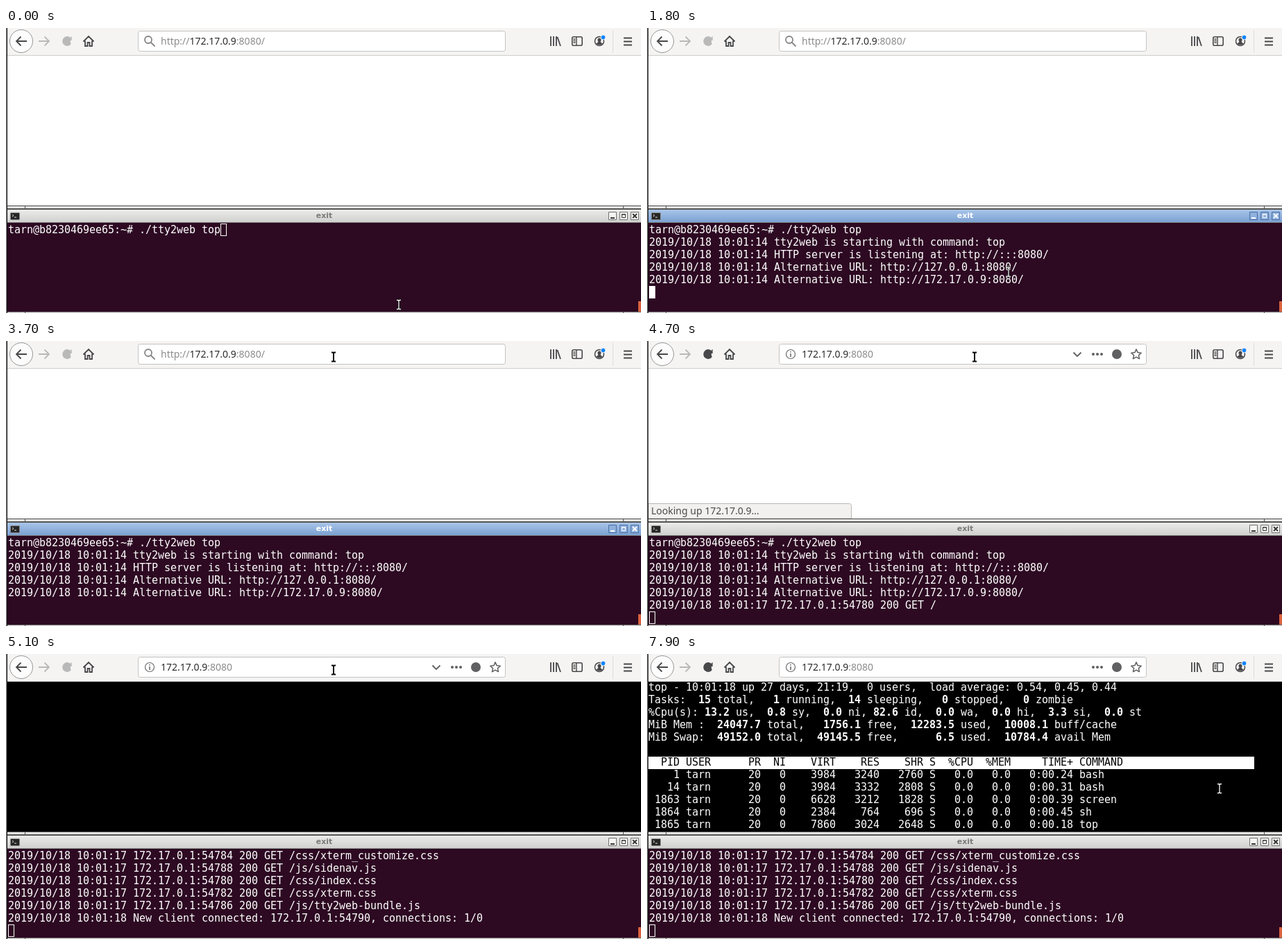
These frames come from a looping animation (915x411 px, 8000 ms). An HTML page:

```html
<!DOCTYPE html>
<html lang="en">
<head>
<meta charset="utf-8">
<title>Terminal in the browser</title>
<style>
html, body { margin: 0; width: 100%; height: 100%; overflow: hidden; background: #fff; }
svg { display: block; width: 915px; height: 411px; }
.mono { font: 15px "DejaVu Sans Mono", monospace; letter-spacing: -.031px; fill: #fff; }
.mono .b { font-weight: bold; }
.ui { font: 14px "Noto Sans", "Open Sans", sans-serif; fill: #8b8b8d; }
.ui .d { fill: #2c2c2e; }
.title { font: bold 11px "DejaVu Sans", sans-serif; text-anchor: middle; }
.size { font: 32px "DejaVu Sans Mono", monospace; letter-spacing: -.266px; fill: #101010; }
.ic { fill: none; stroke: #48484a; stroke-width: 1.8; }
.off { stroke: #b9b9b9; }
.btn { fill: #f6f6f5; stroke: #70706e; }
</style>
</head>
<body>
<svg viewBox="0 0 915 411" xmlns="http://www.w3.org/2000/svg">
  <defs>
    <linearGradient id="grey" x2="0" y2="1"><stop stop-color="#ebebea"/><stop offset="1" stop-color="#cfcfcd"/></linearGradient>
    <linearGradient id="blue" x2="0" y2="1"><stop stop-color="#a9c5e8"/><stop offset="1" stop-color="#789fd1"/></linearGradient>
    <g id="reload">
      <path d="M93.2 22.2A6 6 0 1 1 92.2 14.6"/>
      <path d="M94.6 11.8v6.2h-6.2z" stroke="none"/>
    </g>
  </defs>

  <!-- browser page -->
  <rect width="915" height="411" fill="#fff"/>
  <rect data-t="4800-8000" x="2" y="40" width="913" height="216"/>
  <g id="top" class="mono" data-t="5200-8000"></g>
  <g id="size">
    <rect x="396" y="123" width="127" height="50" rx="15" fill="#f0f0f0"/>
    <text class="size" x="412" y="159">98x12</text>
  </g>
  <g data-t="4700-5000">
    <path d="M2 234.5h289.500q3 0 3 3V256H2z" fill="#f2f1f0" stroke="#b8b8b6"/>
    <text class="ui" x="6" y="250" style="fill:#4a4a4a">Looking up 172.17.0.9…</text>
  </g>

  <!-- toolbar -->
  <rect width="915" height="39" fill="#f5f4f3"/>
  <rect y="39" width="915" height="1" fill="#cdcdcc"/>
  <circle cx="22" cy="19" r="16.500" fill="#fcfcfc" stroke="#969696"/>
  <path class="ic" stroke-width="2" d="M15 19H30M21.500 12.500 15 19l6.500 6.500"/>
  <path class="ic off" d="M47 19H62M55.500 12.500 62 19l-6.500 6.500"/>
  <g class="ic off" data-t="0-3900 3900-4700 4900-5500"><use href="#reload" fill="#b9b9b9"/></g>
  <path class="ic off" data-t="4800-4900" d="M82.500 21.500A6 6 0 1 1 92 23.500"/>
  <g class="ic" data-t="4700-4800 5500-8000"><use href="#reload" fill="#48484a"/></g>
  <path class="ic" d="M111.500 19.500 119 12l7.500 7.500M114 18.500V26h3.500v-5h3v5h3.500v-7.500"/>
  <rect x="190.500" y="4.500" width="529" height="29" rx="3" fill="#fff" stroke="#c3c3c3"/>
  <rect data-t="3900-4700" x="191" y="5" width="528" height="28" rx="3" fill="none" stroke="#0a84ff" stroke-width="2"/>
  <g data-t="0-4700">
    <path class="ic" style="stroke:#858587" d="M210 17a5 5 0 1 1-10 0a5 5 0 1 1 10 0M208.500 20.500l6 6"/>
    <text class="ui" x="223" y="24">http://<tspan class="d">172.17.0.9</tspan>:8080/</text>
  </g>
  <g data-t="4700-8000">
    <circle class="ic" style="stroke:#6c6c6e;stroke-width:1.2" cx="207" cy="19" r="6.500"/>
    <path class="ic" style="stroke:#6c6c6e;stroke-width:1.6" d="M207 18v5M207 15v1.600"/>
    <text class="ui" x="223" y="24"><tspan class="d">172.17.0.9</tspan>:8080</text>
    <g fill="#606062"><circle cx="643" cy="19" r="2"/><circle cx="649" cy="19" r="2"/><circle cx="655" cy="19" r="2"/><circle cx="677" cy="19" r="7"/></g>
    <path id="star" class="ic" style="stroke:#606062;stroke-width:1.500;stroke-linejoin:round"/>
  </g>
  <path data-t="3900-5800" class="ic" style="stroke:#606062" d="M614.500 16.500l5.500 5.500 5.500-5.500"/>
  <path class="ic" d="M785 12v14M789 12v14M793 12v14M794.500 13l4.500 13"/>
  <rect class="ic" style="stroke-width:1.600" x="815.800" y="12.800" width="14.400" height="12.400" rx="2"/>
  <path class="ic" style="stroke-width:1.400" d="M822 13v12M817.500 16h3M817.500 18.500h3M817.500 21h3"/>
  <circle class="ic" style="stroke-width:1.500" cx="855" cy="19" r="6.500"/>
  <path fill="#48484a" d="M852.500 17a2.500 2.500 0 0 1 5 0q0 2-1 3l3 2.500q-4.500 4-9 0l3-2.500q-1-1-1-3"/>
  <circle cx="860.500" cy="13.500" r="3.400" fill="#0a84ff" stroke="#f5f4f3"/>
  <rect x="874" y="3" width="1" height="33" fill="#dcdcda"/>
  <path class="ic" d="M890 14.500h12M890 19.500h12M890 24.500h12"/>

  <!-- window frames -->
  <rect y="256" width="915" height="1" fill="#4c4c4c"/>
  <rect y="257" width="915" height="4" fill="#e4e4e2"/>
  <path d="M27.500 257v3M889.500 257v3" stroke="#555"/>
  <rect y="260" width="915" height="2" fill="#565654"/>
  <rect x="2" y="262" width="913" height="19" fill="url(#grey)"/>
  <rect data-t="700-3900" x="2" y="262" width="913" height="19" fill="url(#blue)"/>
  <rect x="2" y="280" width="913" height="1" fill="#7d7d7b"/>
  <text data-t="0-700 3900-8000" class="title" x="458.500" y="274" fill="#7a7a78">exit</text>
  <text data-t="700-3900" class="title" x="458.500" y="274" fill="#fff">exit</text>
  <rect x="6.500" y="266.500" width="13" height="10" rx="1" fill="#262626" stroke="#888"/>
  <path d="M9 269l2 1.500-2 1.500M12 273h3" fill="none" stroke="#ddd"/>
  <g data-t="0-700 3900-8000" class="btn"><path d="M868.500 265.500h11v11h-11zM884.500 265.500h11v11h-11zM900.500 265.500h11v11h-11z"/></g>
  <g data-t="700-3900" class="btn" style="fill:#8fb0dc;stroke:#4a6fa5"><path d="M868.500 265.500h11v11h-11zM884.500 265.500h11v11h-11z"/><path d="M900.500 265.500h11v11h-11z"/></g>
  <g data-t="0-700 3900-8000" fill="none" stroke="#333"><path stroke-width="2" d="M871 274h6"/><path d="M887.500 268.500h5v5h-5zM887 269h6"/><path stroke-width="1.800" d="M903 268l6 6M909 268l-6 6"/></g>
  <g data-t="700-3900" fill="none" stroke="#fff"><path stroke-width="2" d="M871 274h6"/><path d="M887.500 268.500h5v5h-5zM887 269h6"/><path stroke-width="1.800" d="M903 268l6 6M909 268l-6 6"/></g>

  <!-- terminal -->
  <rect x="2" y="281" width="913" height="128" fill="#2d0922"/>
  <rect x="911" y="394" width="4" height="15" fill="#d9623f"/>
  <rect y="409" width="915" height="1" fill="#6a6a68"/>
  <rect y="410" width="915" height="1" fill="#e4e4e2"/>
  <path d="M27.500 409v2M889.500 409v2" stroke="#444"/>
  <g id="log" class="mono"></g>
  <rect id="caret" width="8" height="17" stroke="#fff"/>
  <rect width="1" height="411" fill="#8a8a8a"/>
  <rect x="1" width="1" height="411" fill="#111"/>

  <g id="beam" fill="none">
    <path id="halo" stroke-width="3" d="M-3-6.500h2l1 1 1-1h2M0-5.500v11M-3 6.500h2l1-1 1 1h2"/>
    <path id="ink" stroke-width="1.300" d="M-3-6.500h2l1 1 1-1h2M0-5.500v11M-3 6.500h2l1-1 1 1h2"/>
  </g>
  <path id="arrow" d="M0 0v14l3.300-3 2.200 5 2.200-1-2.200-4.800H10z" stroke="#fff"/>
</svg>
<script>
const LOOP = 8000, STEP = 100;
const $ = id => document.getElementById(id);
const keep = s => s.replace(/ /g, '\u00a0');
const line = (x, y, s, attr = '') => `<text x="${x}" y="${y}" ${attr}>${s}</text>`;

// process monitor
const user = 'tarn';
const summary = [
  'top - 10:01:18 up 27 days, 21:19,  0 users,  load average: 0.54, 0.45, 0.44',
  'Tasks:  15 total,   1 running,  14 sleeping,   0 stopped,   0 zombie',
  '%Cpu(s): 13.2 us,  0.8 sy,  0.0 ni, 82.6 id,  0.0 wa,  0.0 hi,  3.3 si,  0.0 st',
  'MiB Mem :  24047.7 total,   1756.1 free,  12283.5 used,  10008.1 buff/cache',
  'MiB Swap:  49152.0 total,  49145.5 free,      6.5 used.  10784.4 avail Mem'
];
const heading = '  PID USER      PR  NI    VIRT    RES    SHR S  %CPU  %MEM     TIME+ COMMAND';
const tasks = [
  [1, 3984, 3240, 2760, '24', 'bash'],
  [14, 3984, 3332, 2808, '31', 'bash'],
  [1863, 6628, 3212, 1828, '39', 'screen'],
  [1864, 2384, 764, 696, '45', 'sh'],
  [1865, 7860, 3024, 2648, '18', 'top']
];
const pad = (v, n) => String(v).padStart(n);
const taskRow = ([pid, virt, res, shr, time, cmd]) =>
  `${pad(pid, 5)} ${user}      20   0 ${pad(virt, 7)}${pad(res, 7)}${pad(shr, 7)} S   0.0   0.0   0:00.${time} ${cmd}`;
const rowY = i => 53 + 18 * i;

$('top').innerHTML =
  summary.map((s, i) => line(2, rowY(i), i
    ? keep(s).replace(/\d+(\.\d)?/g, '<tspan class="b">$&</tspan>') : keep(s))).join('') +
  '<rect x="2" y="148" width="873" height="18"/>' +
  line(2, rowY(6), keep(heading), 'style="fill:#000"') +
  tasks.map((r, i) => line(2, rowY(7 + i), keep(taskRow(r)))).join('');

// server log
const get = (port, path) => `2019/10/18 10:01:17 172.17.0.1:${port} 200 GET /${path}`;
const first = '2019/10/18 10:01:14 ';
const log = [
  user + '@b8230469ee65:~# ./tty2web top',
  first + 'tty2web is starting with command: top',
  first + 'HTTP server is listening at: http://:::8080/',
  first + 'Alternative URL: http://127.0.0.1:8080/',
  first + 'Alternative URL: http://172.17.0.9:8080/',
  get(54780, ''),
  get(54786, 'config.js'),
  get(54784, 'css/xterm_customize.css'),
  get(54788, 'js/sidenav.js'),
  get(54780, 'css/index.css'),
  get(54782, 'css/xterm.css'),
  get(54786, 'js/tty2web-bundle.js'),
  '2019/10/18 10:01:18 New client connected: 172.17.0.1:54790, connections: 1/0'
];
const logSize = [[0, 1], [1800, 5], [4700, 6], [4800, 12], [5100, 13]];

$('star').setAttribute('d', 'M' + Array.from({ length: 10 }, (_, i) => {
  const a = i * Math.PI / 5, r = i % 2 ? 3.6 : 7.6;
  return (705 + r * Math.sin(a)).toFixed(1) + ' ' + (19.5 - r * Math.cos(a)).toFixed(1);
}).join('L') + 'z');

// pointer path: time, x, y
const path = [
  [400, 566, 399], [700, 521, 352], [2300, 521, 352], [2500, 462, 326], [2700, 396, 291],
  [2900, 455, 262], [3100, 533, 242], [3200, 533, 242], [3400, 505, 115], [3500, 486, 48],
  [3600, 474, 17], [3700, 472, 23], [5600, 472, 23], [6000, 520, 66], [6300, 606, 124],
  [6500, 762, 154], [6800, 840, 184], [7700, 840, 184], [7900, 825, 194]
];
function pointer(t) {
  const i = path.findIndex(p => p[0] > t);
  if (i === 0) return path[0].slice(1);
  if (i < 0) return path[path.length - 1].slice(1);
  const [a, ax, ay] = path[i - 1], [b, bx, by] = path[i], k = (t - a) / (b - a);
  return [Math.round(ax + (bx - ax) * k), Math.round(ay + (by - ay) * k)];
}

const timed = [...document.querySelectorAll('[data-t]')].map(el =>
  [el, el.dataset.t.split(' ').map(r => r.split('-').map(Number))]);
const show = (el, on) => { el.style.display = on ? '' : 'none'; };
let shown = -1;

function drawTerminal(t) {
  const n = logSize.filter(s => s[0] <= t).pop()[1];
  if (n !== shown) {
    $('log').innerHTML = log.slice(Math.max(0, n - 6), n)
      .map((s, i) => line(3, 296 + 18 * i, keep(s))).join('');
    shown = n;
  }
  const caret = $('caret'), focus = t >= 700 && t < 3900;
  const since = t < 1800 ? t - 700 : t - 1800;
  caret.setAttribute('x', n === 1 ? 309.5 : 3.5);
  caret.setAttribute('y', 282.5 + 18 * (n === 1 ? 0 : Math.min(n, 6)));
  caret.setAttribute('fill', focus ? '#fff' : 'none');
  show(caret, !focus || since % 1200 < 600);
}

function drawPointer(t) {
  const [x, y] = pointer(t), inBar = y < 34;
  const arrow = !inBar && y < 281 && (t < 4800 || y < 40);
  show($('arrow'), arrow);
  show($('beam'), !arrow);
  $(arrow ? 'arrow' : 'beam').setAttribute('transform', `translate(${x} ${y})`);
  $('ink').setAttribute('stroke', inBar ? '#000' : '#fff');
  $('ink').setAttribute('stroke-width', inBar ? 2 : 1.3);
  $('halo').setAttribute('stroke', inBar ? '#fff' : '#000');
}

function draw(t) {
  for (const [el, spans] of timed) show(el, spans.some(([a, b]) => t >= a && t < b));
  const fade = Math.min(1, Math.max(0, (6800 - t) / 300));
  $('size').style.opacity = t < 5300 ? 0 : 0.75 * fade;
  drawTerminal(t);
  drawPointer(t);
}

const start = performance.now();
function tick() {
  const t = (performance.now() - start) % LOOP;
  draw(Math.floor(t / STEP) * STEP);
  requestAnimationFrame(tick);
}
tick();
</script>
</body>
</html>
```
